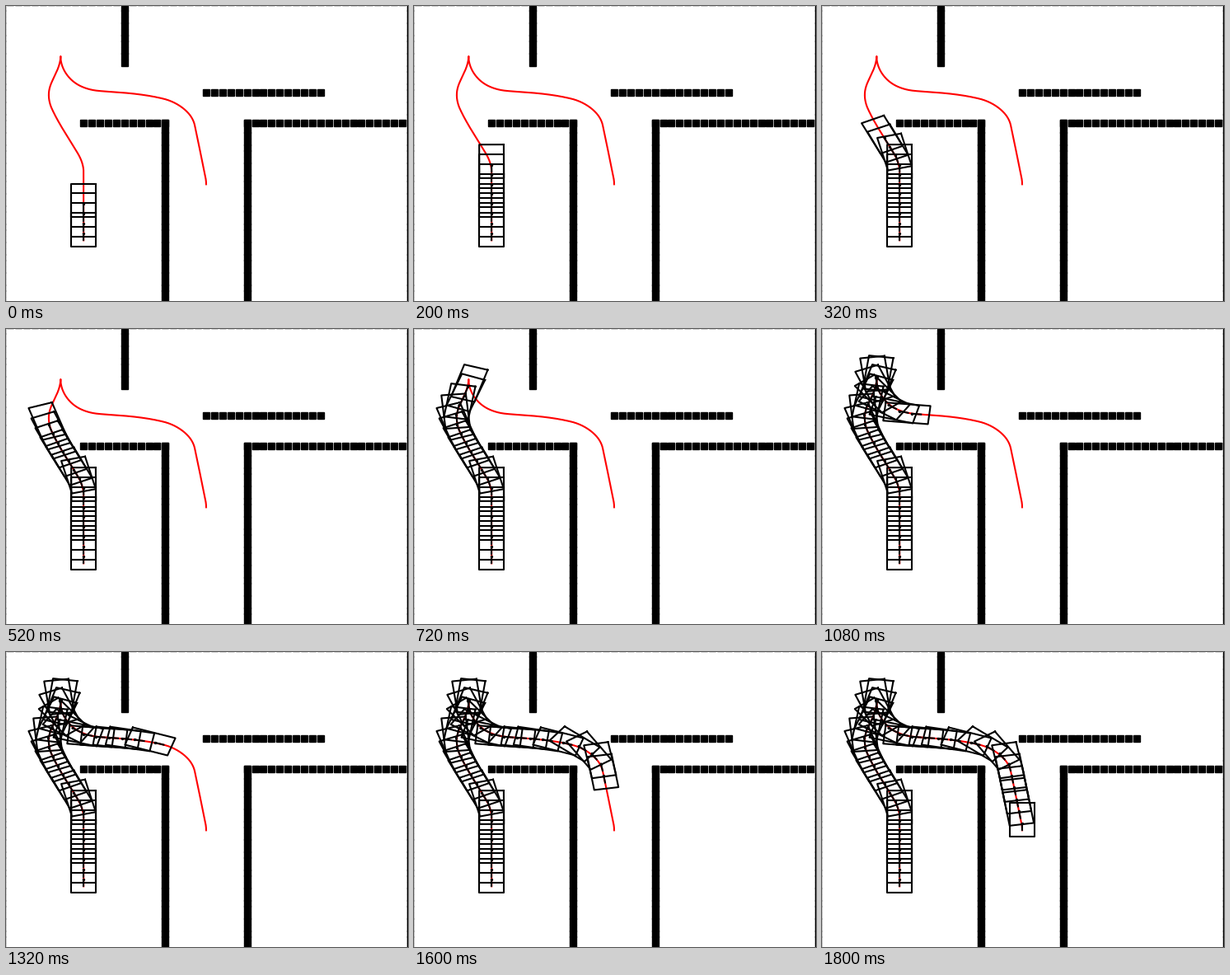
Recreate the animation shown at these times as a matplotlib script. Size 488x358 px, loop 2200 ms.

```python
import math

import matplotlib.pyplot as plt
import numpy as np
from matplotlib.animation import FuncAnimation

W, H = 488, 358
TICK, TICKS = 40, 55

# Map: 50 x 50 units, its edges just outside the stage
LEFT, TOP = -5.0, -5.4
MAP_W, MAP_H = 496.0, 369.6

# Car, measured from the rear axle
FRONT, REAR, HALF = 4.5, -1.0, 1.5
ARROW = 1.15

# Spacing of the drawn cars: search steps, then the final approach
STEP, STEPS = 1.603, 29
FINAL_STEP, FINAL_STEPS = 1.98, 9

# Key poses: x, y, heading in degrees left of straight up
FORWARD = [(10, 10.8, 0), (10, 22, 0), (9.29, 25.07, 24), (6.13, 32.36, 19),
           (5.81, 35.61, -9), (6.21, 37.09, -20), (7.19, 41.02, -1)]
REVERSE = [FORWARD[-1], (9.07, 36.55, 48), (11.7, 35.36, 82),
           (14.62, 35.06, 84), (19.75, 34.05, 72), (22.9, 31.55, 32),
           (23.6, 29.68, 9), (24.88, 21.4, 8.8), (25, 20, 0)]


def direction(tilt):
    a = math.radians(tilt)
    return np.array([-math.sin(a), math.cos(a)])


def drive(stops, gear, n=60):
    """Smooth curve through the stops; rows of x, y, tilt."""
    t = np.linspace(0, 1, n)[:, None]
    rows = []
    for (x0, y0, a0), (x1, y1, a1) in zip(stops, stops[1:]):
        p, q = np.array([x0, y0]), np.array([x1, y1])
        chord = gear * np.hypot(*(q - p))
        u, v = chord * direction(a0), chord * direction(a1)
        xy = ((2 * t**3 - 3 * t**2 + 1) * p + (t**3 - 2 * t**2 + t) * u
              + (3 * t**2 - 2 * t**3) * q + (t**3 - t**2) * v)
        d = gear * ((6 * t**2 - 6 * t) * (p - q)
                    + (3 * t**2 - 4 * t + 1) * u + (3 * t**2 - 2 * t) * v)
        tilt = np.degrees(np.arctan2(-d[:, 0], d[:, 1]))
        rows.append(np.column_stack([xy, tilt]))
    return np.vstack(rows)


def draw_wall(ax, x0, y0, x1, y1):
    n = max(x1 - x0, y1 - y0) + 1
    ax.plot(np.linspace(x0, x1, n), np.linspace(y0, y1, n),
            "sk", markersize=6)


def draw_car(ax, x, y, tilt):
    ahead = direction(tilt)
    right = np.array([ahead[1], -ahead[0]])

    def line(points, **style):
        pts = np.array([(x, y) + f * ahead + s * right for f, s in points])
        return ax.plot(pts[:, 0], pts[:, 1], "-k", lw=1.5, **style)[0]

    return [
        line([(FRONT, HALF), (FRONT, -HALF), (REAR, -HALF),
              (REAR, HALF), (FRONT, HALF)]),
        line([(0, 0), (ARROW, 0)], marker="o", markevery=[1],
             markersize=2.4, markeredgewidth=0),
    ]


fig = plt.figure(figsize=(W / 100, H / 100), dpi=100, facecolor="white")
ax = fig.add_axes([LEFT / W, 1 - (TOP + MAP_H) / H, MAP_W / W, MAP_H / H])
ax.set_xlim(0, 50)
ax.set_ylim(0, 50)
ax.axis("off")

for edge in (0, 50):
    draw_wall(ax, 0, edge, 50, edge)
    draw_wall(ax, edge, 0, edge, 50)
for x in (20, 30):
    draw_wall(ax, x, 0, x, 30)
draw_wall(ax, 10, 30, 20, 30)
draw_wall(ax, 30, 30, 50, 30)
draw_wall(ax, 25, 35, 39, 35)
draw_wall(ax, 15, 40, 15, 50)

route = np.vstack([drive(FORWARD, 1), drive(REVERSE, -1)])
ax.plot(route[:, 0], route[:, 1], "-r", lw=1.5)

legs = np.hypot(*np.diff(route[:, :2], axis=0).T)
dist = np.concatenate([[0], np.cumsum(legs)])
stations = np.concatenate([
    STEP * np.arange(STEPS),
    dist[-1] - FINAL_STEP * np.arange(FINAL_STEPS)[::-1],
])
cars = [draw_car(ax, *(np.interp(s, dist, col) for col in route.T))
        for s in stations]


def last_car(tick):
    # Three updates in every five ticks; the pace dips mid-way
    step = min(27, 3 * (tick // 5) + (0, 0, 1, 2, 2)[tick % 5])
    return int(np.interp(step, [0, 16, 24, 27], [3, 25, 33, 37]) + 0.8)


def update(tick):
    last = last_car(tick)
    for i, car in enumerate(cars):
        for part in car:
            part.set_visible(i <= last)
    return [part for car in cars for part in car]


anim = FuncAnimation(fig, update, frames=TICKS, interval=TICK,
                     init_func=lambda: update(0), repeat=True,
                     repeat_delay=0, blit=False)
plt.show()
```
